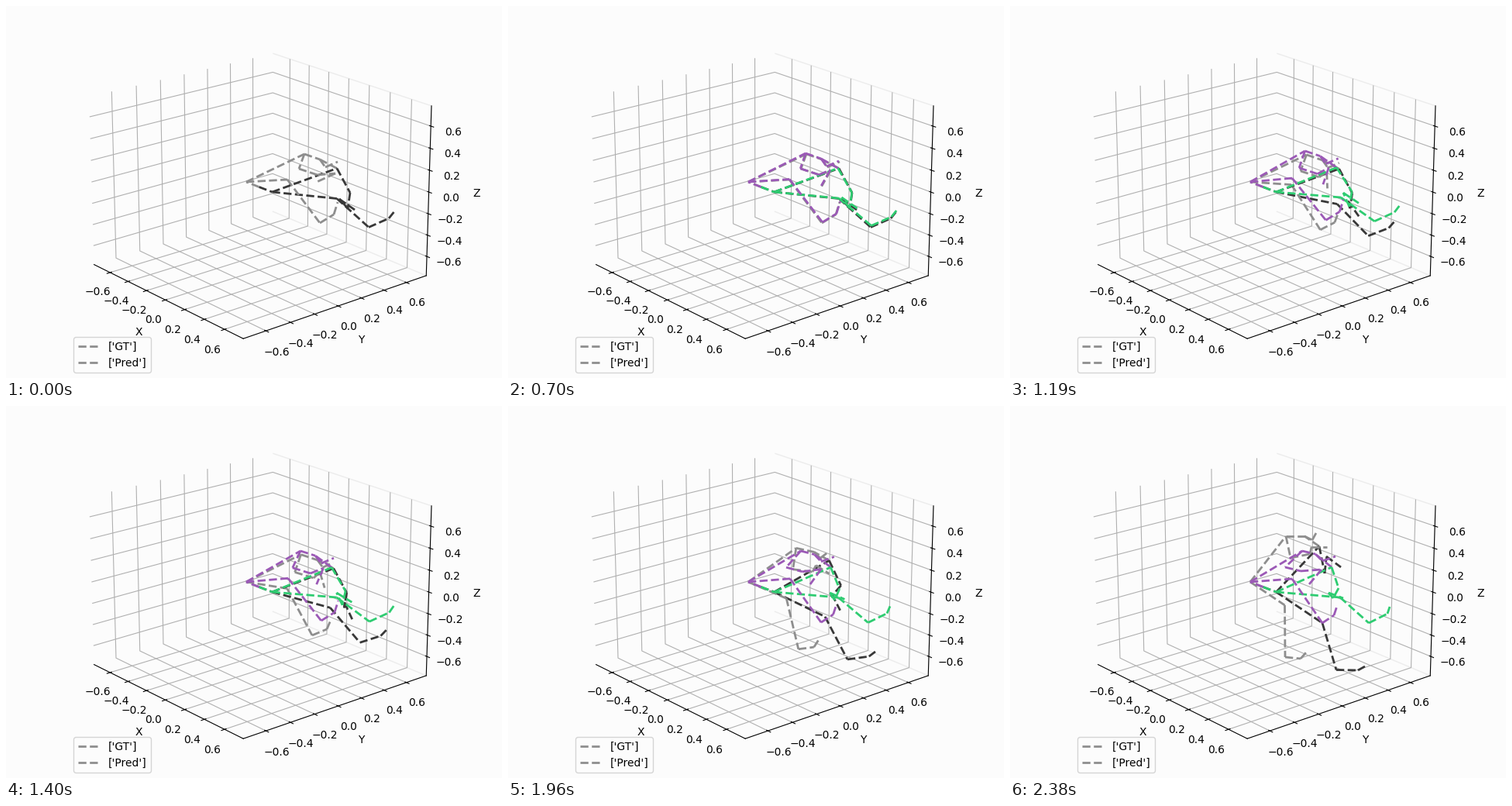
A matplotlib script that plays this animation: 640 by 480 pixels, repeating every 2.45 s.

```python
import matplotlib.pyplot as plt
import numpy as np
from matplotlib.animation import FuncAnimation
from matplotlib.collections import LineCollection
from matplotlib.lines import Line2D

FRAMES, STEP_MS = 35, 70
LAST = FRAMES - 1
MOVE_START = 13     # the body leaves its resting pose
SEEN = 9            # last step before the prediction splits off
BACK = "#fcfcfc"
TRUE_COLORS = {"L": "#8e8e8e", "R": "#383838"}
PRED_COLORS = {"L": "#9b59b6", "R": "#2ecc71"}

# Joints are stage pixels written as complex numbers x + yj
FIXED = {"root": 326.5 + 233.5j, "Lhip": 310 + 227j, "Rhip": 343.5 + 240j}


def limb(joints, rest, end, pred_end, nudge, first=MOVE_START, power=1.0, swing=0.0):
    """A chain of bones; the first joint is its anchor, the rest have key points."""
    joints = joints.split()
    return dict(bones=list(zip(joints, joints[1:])), rest=rest, end=end, pred_end=pred_end,
                nudge=nudge, first=first, power=power, swing=swing)


LIMBS = [
    limb("Rhip Rknee", [427 + 248.5j], [403 + 280j], [426 + 247j], -1.5j),
    limb("Rknee Rankle Rfoot Rtoe",
         [468 + 285.5j, 494 + 274j, 502 + 264j],
         [421 + 340.5j, 449 + 341j, 458 + 336j],
         [463 + 280j, 487 + 268j, 490 + 259j], 3 - 8j, power=1.3),
    limb("Lhip Lknee", [363 + 224j], [354.5 + 257j], [364 + 223j], 1 - 2j),
    limb("Lknee Lankle Lfoot Ltoe",
         [405 + 280j, 423 + 269j, 428 + 253j],
         [355 + 324j, 375 + 326j, 382 + 318j],
         [403 + 280j, 418 + 270j, 422 + 258j], 3 - 4j, power=1.3),
    limb("Rhip Rshoulder", [427 + 209.5j], [399 + 181j], [415 + 208j], -5 - 1j, power=3),
    limb("Rshoulder Relbow Rwrist", [444 + 241j, 441 + 261j], [406 + 216j, 408 + 197j],
         [424 + 235j, 417 + 248j], -1 - 1j, power=5),
    limb("Rwrist Rthumb Rhand", [430 + 249j, 450 + 263j], [408 + 194j, 427 + 208j],
         [411 + 241j, 430 + 248j], 2 - 8j, swing=0.6),
    limb("Lhip Lshoulder neck face crown",
         [385 + 191j, 405 + 198j, 412 + 208j, 428 + 201j],
         [356 + 168j, 380 + 168j, 390 + 173j, 396 + 162j],
         [377 + 187j, 394 + 191j, 403 + 200j, 420 + 194j], -4 - 4j, power=3),
    limb("Lshoulder Lelbow Lwrist", [378 + 210j, 402 + 218j], [362 + 196j, 387 + 191j],
         [355 + 208j, 375 + 213j], -3 - 1j, power=3),
    limb("Lwrist Lthumb Lhand", [425 + 216j, 401 + 227j], [389 + 182j, 409 + 182j],
         [402 + 211j, 386 + 230j], -2 - 3j, first=0, power=1.2),
]

BONES = [("root", "Rhip"), ("root", "Lhip"), ("Rshoulder", "neck")]
BONES += [bone for part in LIMBS for bone in part["bones"]]


def key_pose(key):
    pose = dict(FIXED)
    for part in LIMBS:
        pose.update({child: p for (_, child), p in zip(part["bones"], part[key])})
    return pose


REST, END, PRED_END = map(key_pose, ("rest", "end", "pred_end"))
NUDGE = {child: part["nudge"] for part in LIMBS for _, child in part["bones"]}


def ramp(t, start, stop):
    return float(np.clip((t - start) / (stop - start), 0, 1))


def true_pose(t):
    """Turn and stretch every bone about its parent, from rest to the end pose."""
    pose = dict(FIXED)
    for part in LIMBS:
        u = ramp(t, part["first"], LAST)
        for parent, child in part["bones"]:
            start = REST[child] - REST[parent]
            change = (END[child] - END[parent]) / start
            angle = np.angle(change) * u ** part["power"] + part["swing"] * np.sin(np.pi * u)
            stretch = abs(change) ** np.sin(np.pi / 2 * u)
            pose[child] = pose[parent] + start * stretch * np.exp(1j * angle)
    return pose


def pred_pose(t):
    """Leave the true pose by a small nudge, then ease to the predicted end."""
    pose = true_pose(min(t, MOVE_START))
    leave, u = ramp(t, SEEN, MOVE_START), ramp(t, MOVE_START, LAST)
    ease = u * u * (3 - 2 * u)
    for joint, nudge in NUDGE.items():
        near = pose[joint] + nudge * leave
        pose[joint] = near + (PRED_END[joint] - near) * ease
    return pose


def segments(pose):
    return [[(pose[j].real, pose[j].imag) for j in bone] for bone in BONES]


fig = plt.figure(figsize=(6.4, 4.8), dpi=100, facecolor=BACK)

# Empty 3D box
box = fig.add_axes([0, 0, 1, 1], projection="3d")
box.patch.set_visible(False)
box.view_init(elev=20, azim=-40)
reach = 0.75 * 25 / 24
box.set(xlim=(-reach, reach), ylim=(-reach, reach), zlim=(-reach, reach),
        xlabel="X", ylabel="Y", zlabel="Z")
for axis in (box.xaxis, box.yaxis, box.zaxis):
    axis.set_pane_color((1, 1, 1, 0))
box.yaxis.pane.set(alpha=None, facecolor="none", edgecolor="#ececec")
handles = [Line2D([], [], color=TRUE_COLORS["L"], lw=2, ls="--", label=text)
           for text in ("['GT']", "['Pred']")]
box.legend(handles=handles, loc="lower left", facecolor=BACK)

# Skeletons in pixel coordinates
stage = fig.add_axes([0, 0, 1, 1])
stage.set(xlim=(0, 640), ylim=(480, 0))
stage.axis("off")


def skeleton(colors):
    shades = [colors["R" if child[0] == "R" else "L"] for _, child in BONES]
    lines = LineCollection([], colors=shades, linewidths=2, linestyles="--")
    return stage.add_collection(lines, autolim=False)


truth, guess = skeleton(TRUE_COLORS), skeleton(PRED_COLORS)


def update(n):
    truth.set_segments(segments(true_pose(n)))
    guess.set_segments(segments(pred_pose(n)) if n > SEEN else [])
    return truth, guess


anim = FuncAnimation(fig, update, frames=FRAMES, interval=STEP_MS,
                     repeat=True, repeat_delay=0, blit=False)
plt.show()
```
